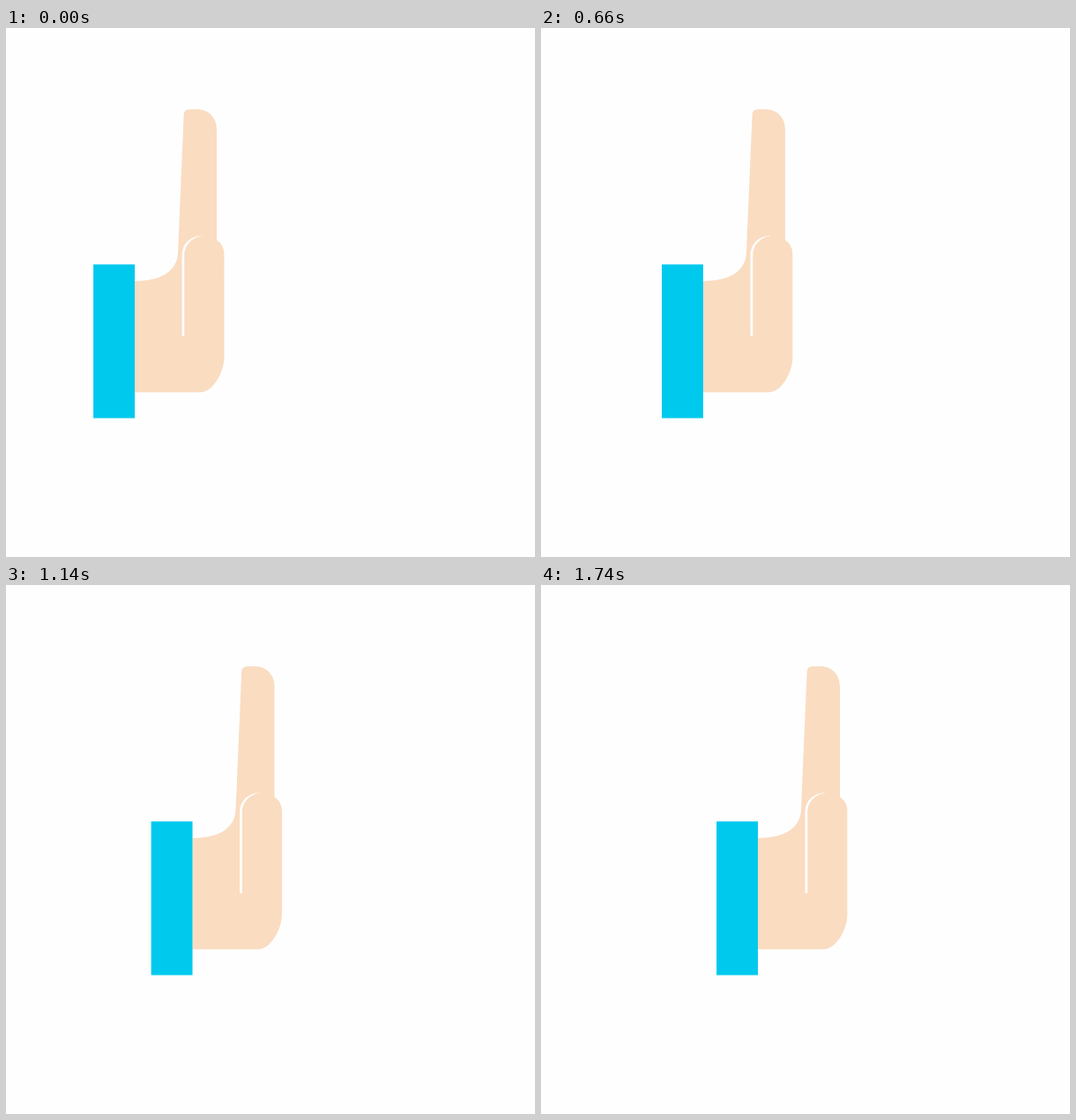
These frames come from a looping animation (600 by 600 pixels, 1.77 s). An HTML page with a canvas:

```html
<!DOCTYPE html>
<html lang="en">
<head>
<meta charset="utf-8">
<title>Sliding hand</title>
<style>
html, body { margin: 0; width: 100%; height: 100%; overflow: hidden; background: #fefefe; }
canvas { display: block; width: 600px; height: 600px; }
</style>
</head>
<body>
<canvas id="stage" width="600" height="600"></canvas>
<script>
const ctx = document.getElementById('stage').getContext('2d');
const STEP = 30, STEPS = 59, TRAVEL = 100;

const hand = new Path2D(`M146 287
  C176 287 194 276 195 255
  L201.7 98 Q202 92.3 208 92.2 L217 92.2
  C230 92.2 239 102 239 115
  L239 240.5 Q247.4 246 247.4 256
  L247.4 374 C247.4 390 235 413.3 220 413.3
  L146 413.3 Z`);

const crease = new Path2D(`M199.6 349.5 L199.6 258
  C199.6 244 210 235.2 224 235.4
  C211 236.8 202.3 246 202.3 258
  L202.3 349.5 Z`);

function fill(path, color) {
  ctx.fillStyle = color;
  ctx.fill(path);
}

function draw(ms) {
  const step = Math.floor(ms / STEP) % STEPS;
  ctx.fillStyle = '#fefefe';
  ctx.fillRect(0, 0, 600, 600);
  ctx.save();
  ctx.translate(TRAVEL * step / (STEPS - 1), 0);
  fill(hand, '#fadcc1');
  fill(crease, '#fefefe');
  ctx.fillStyle = '#00c9ee';
  ctx.fillRect(99.1, 268.2, 46.9, 174.3);
  ctx.restore();
}

const start = performance.now();
function tick() {
  draw(performance.now() - start);
  requestAnimationFrame(tick);
}
draw(0);
requestAnimationFrame(tick);
</script>
</body>
</html>
```
